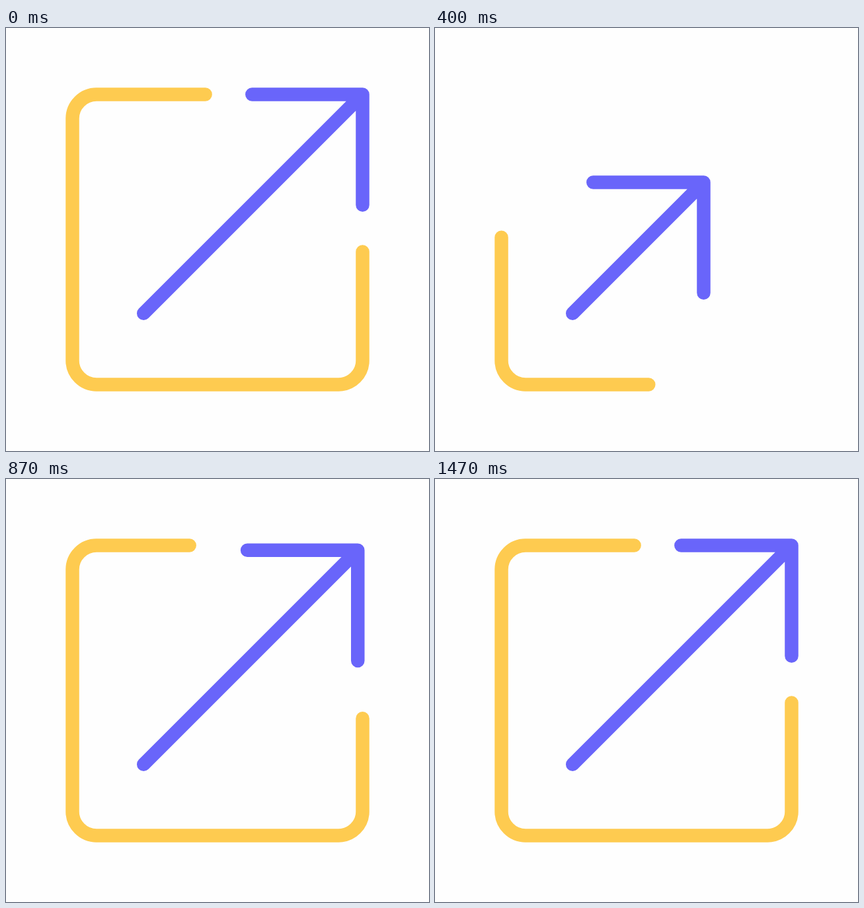
An HTML page for the animation above (2 s loop, 640 px wide and 640 px high).

```html
<!DOCTYPE html>
<html lang="en">
<head>
<meta charset="utf-8">
<title>Open arrow</title>
<style>
  html, body { margin: 0; width: 100%; height: 100%; overflow: hidden; background: #fefefe; }
  svg { display: block; width: 100%; height: 100%; }
  path { fill: none; stroke-width: 20.5; stroke-linecap: round; stroke-linejoin: round; }
  #box { stroke: #fecb50; }
  #arrow { stroke: #6965fa; }
</style>
</head>
<body>
<svg viewBox="0 0 640 640">
  <path id="box" pathLength="100" d="M301.6 100.5H137.1A36.6 36.6 0 0 0 100.5 137.1V502.9A36.6 36.6 0 0 0 137.1 539.5H502.9A36.6 36.6 0 0 0 539.5 502.9V338.4"/>
  <path id="arrow"/>
</svg>
<script>
  const LOOP = 2000, STEP = 100 / 3;
  const box = document.getElementById('box');
  const arrow = document.getElementById('arrow');

  // [step, value]: percent trimmed from each end, and pixels the tip is pulled back
  const trim = { bend: 0.22, keys: [[0, 0], [17, 43], [27, 0], [33, 17.53], [39, 0]] };
  const pull = { bend: 0.24, keys: [[0, 0], [17, 174.3], [27, 0], [33, 88], [39, 13.3], [44, 0]] };

  // cubic-bezier(bend, 0, 1 - bend, 1)
  function ease(x, bend) {
    let lo = 0, hi = 1, t = x;
    for (let i = 0; i < 24; i++) {
      t = (lo + hi) / 2;
      const r = 1 - t;
      const bx = 3 * bend * t * r * r + 3 * (1 - bend) * t * t * r + t * t * t;
      if (bx < x) lo = t; else hi = t;
    }
    return t * t * (3 - 2 * t);
  }

  function valueAt({ bend, keys }, step) {
    const i = keys.findIndex(([at]) => at > step);
    if (i < 0) return keys[keys.length - 1][1];
    const [a, from] = keys[i - 1], [b, to] = keys[i];
    return from + (to - from) * ease((step - a) / (b - a), bend);
  }

  function draw(ms) {
    // 30 steps per second on a 10 ms clock
    const step = Math.floor((Math.floor(ms / 10) * 10 + 3.4) / STEP);
    const cut = valueAt(trim, step);
    box.setAttribute('stroke-dasharray', `${100 - 2 * cut} 200`);
    box.setAttribute('stroke-dashoffset', -cut);

    const d = valueAt(pull, step);
    const x = 539.5 - d, y = 100.5 + d;
    arrow.setAttribute('d', `M${x - 167.2} ${y}H${x}V${y + 167.2}M208.2 431.8L${x} ${y}`);
  }

  const start = performance.now();
  function tick() {
    draw((performance.now() - start) % LOOP);
    requestAnimationFrame(tick);
  }
  tick();
</script>
</body>
</html>
```
